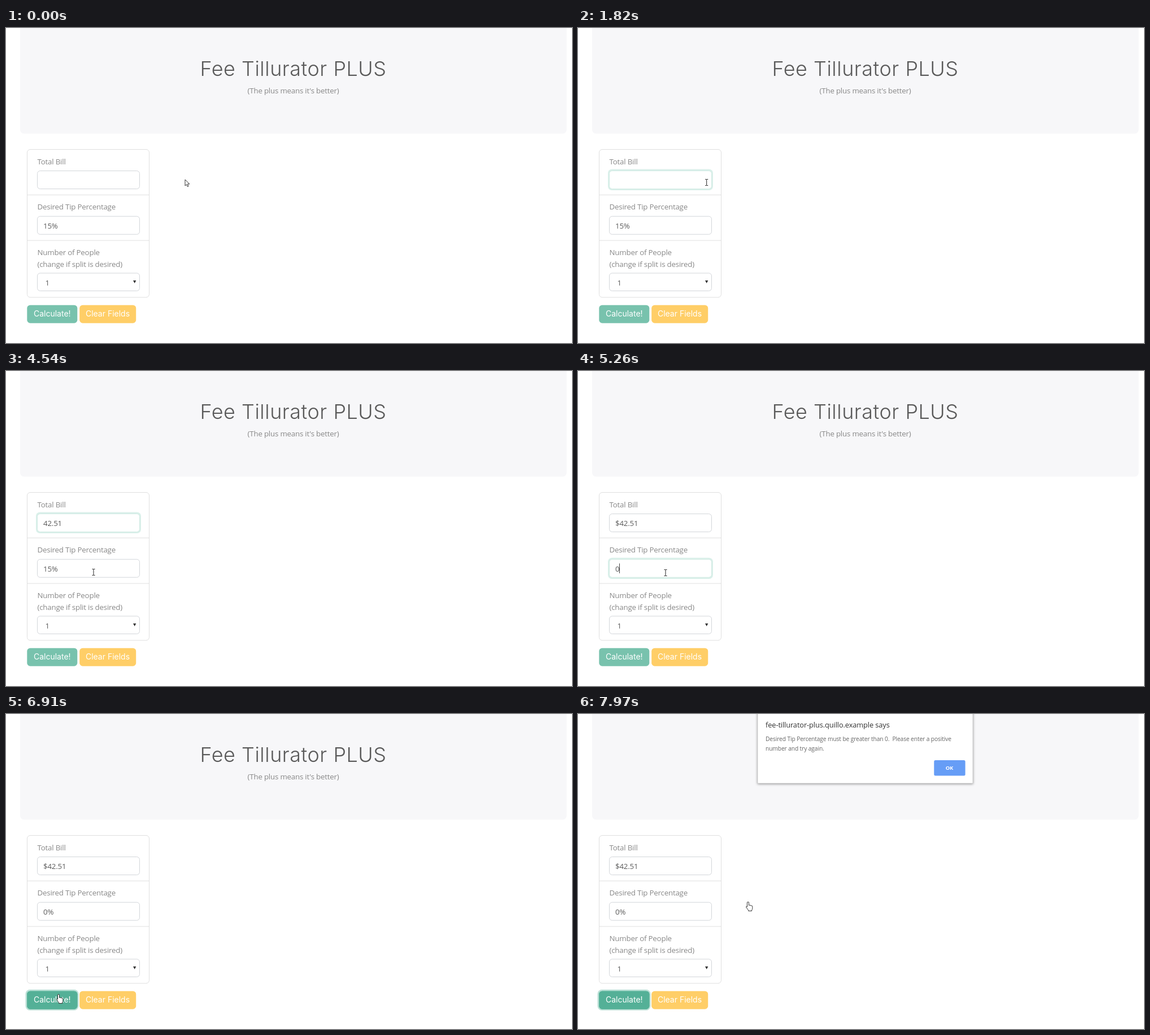
Recreate the animation shown at these times as an HTML page. Size 1002 by 559 pixels, loop 8000 ms.

```html
<!DOCTYPE html>
<html lang="en">
<head>
<meta charset="utf-8">
<title>Tip form</title>
<style>
html, body { margin: 0; width: 100%; height: 100%; overflow: hidden; background: #fff; }
svg { display: block; }
text { font: 13.3px "Open Sans", "Noto Sans", sans-serif; letter-spacing: -.2px; fill: #888; }
.mid { text-anchor: middle; }
.title { font: 300 36px Inter, sans-serif; letter-spacing: .5px; fill: #5a5a5a; }
.label { font: 14px Inter, sans-serif; letter-spacing: 0; fill: #fff; }
.value { fill: #5a5a5a; }
.box { fill: #fff; stroke: #d3d6da; }
.focus .box { stroke: #d0eae3; }
.ring { fill: #daf0ea; }
.line { fill: none; stroke: #dfdfdf; }
#caret { stroke: #444; }
#dialog { filter: drop-shadow(0 1px 2px rgba(0,0,0,.4)); }
#dialog text { font-size: 10.25px; letter-spacing: -.12px; fill: #666; }
#dialog .host { font-size: 12.8px; letter-spacing: -.1px; fill: #333; }
#dialog .ok { font-size: 9.5px; font-weight: 700; fill: #fff; }
#pointer path { fill: #fff; stroke: #222; stroke-width: .9; stroke-linejoin: round; }
#pointer #beam { fill: none; stroke-width: 1; }
</style>
</head>
<body>
<svg width="1002" height="559">
  <rect x="25" y="-10" width="967.5" height="197.5" rx="7" fill="#f7f7f9"/>
  <text class="title mid" x="508.5" y="85">Fee Tillurator PLUS</text>
  <text class="mid" x="508.5" y="115.5">(The plus means it's better)</text>

  <rect class="line" x="37.5" y="215.5" width="216" height="262.5" rx="5.5"/>
  <path class="line" d="M38 296.2H253M38 377H253"/>
  <text x="55.5" y="241.5">Total Bill</text>
  <text x="55.5" y="322.3">Desired Tip Percentage</text>
  <text x="55.5" y="403">Number of People</text>
  <text x="55.5" y="423.5">(change if split is desired)</text>

  <rect class="box" x="55.5" y="253.5" width="181" height="32" rx="5"/>
  <g class="focus" id="billFocus">
    <rect class="ring" x="53" y="250.5" width="186" height="37.5" rx="7"/>
    <rect class="box" x="55.5" y="253.5" width="181" height="32" rx="5"/>
  </g>
  <text class="value" id="bill" x="66" y="275.2"></text>

  <rect class="box" x="55.5" y="334.2" width="181" height="32" rx="5"/>
  <g class="focus" id="tipFocus">
    <rect class="ring" x="53" y="331.5" width="186" height="37.5" rx="7"/>
    <rect class="box" x="55.5" y="334.2" width="181" height="32" rx="5"/>
  </g>
  <rect id="selection" x="66" y="341" width="26" height="18" fill="#3390ff"/>
  <text class="value" id="tip" x="66" y="355.6"></text>
  <path id="caret"/>

  <rect class="box" x="55.5" y="435" width="181" height="31.5" rx="5"/>
  <text class="value" x="69.5" y="456.5">1</text>
  <path d="M225 448h5.4l-2.7 5z" fill="#333"/>

  <rect id="pressRing" x="34.5" y="489" width="94" height="37" rx="8" fill="#bbe0d6"/>
  <rect x="37.3" y="491.7" width="89" height="32" rx="5.5" fill="#78c2ad"/>
  <rect id="hover" x="37.3" y="491.7" width="89" height="32" rx="5.5" fill="#5eb69d"/>
  <rect id="press" x="37.3" y="491.7" width="89" height="32" rx="5.5" fill="#54b097"/>
  <rect x="130.2" y="491.7" width="100" height="32" rx="5.5" fill="#ffce67"/>
  <text class="label mid" x="81.8" y="512.4">Calculate!</text>
  <text class="label mid" x="180" y="512.4">Clear Fields</text>

  <g id="dialog">
    <rect x="318" y="-60" width="381" height="183" fill="#fff" stroke="#c4c4c4" stroke-width=".7"/>
    <text class="host" x="332" y="23.8">fee-tillurator-plus.quillo.example says</text>
    <text x="332" y="47.5">Desired Tip Percentage must be greater than 0.&nbsp; Please enter a positive</text>
    <text x="332" y="64.5">number and try again.</text>
    <rect x="630.3" y="82" width="55.3" height="27.5" rx="2.5" fill="#669df6"/>
    <text class="ok mid" x="657.5" y="99.3">OK</text>
  </g>

  <g id="pointer">
    <path id="arrow" d="M0 0v11l2.5-2.4 1.8 4 1.8-.8-1.7-3.9h3.5z"/>
    <path id="beam" d="M-2.5-5.5h2l.5.5.5-.5h2M0-5V5M-2.5 5.5h2l.5-.5.5.5h2"/>
    <path id="hand" d="M-1.5 1a1.5 1.5 0 0 1 3 0v4.5q1.3-.9 2.3.3 1.4-.7 2.2.5 1.8-.3 1.8 1.4v3q0 2-1.2 3.3v1.5h-6v-1.3l-3.8-5.2q-.6-1.6.9-1.6l.8.8z"/>
  </g>
</svg>
<script>
const LOOP = 8000, BLINK = 530;
const $ = id => document.getElementById(id);

// time, x, y, shape from then on
const moves = [
  [0, 317, 269, 'arrow'], [530, 317, 269, 'arrow'], [620, 292, 275, 'arrow'],
  [750, 264, 277, 'arrow'], [920, 242, 275, 'beam'], [1000, 237.5, 274.5, 'beam'],
  [1320, 227.7, 274, 'beam'], [3450, 227.7, 274, 'beam'], [3700, 207, 298, 'arrow'],
  [3850, 190, 334, 'beam'], [4020, 172, 367, 'arrow'], [4230, 161, 381, 'arrow'],
  [4310, 159, 369, 'arrow'], [4380, 157, 364, 'beam'], [4540, 155, 357, 'beam'],
  [4780, 155, 357, 'beam'], [5010, 160, 360, 'beam'], [5180, 160, 360, 'beam'],
  [5260, 155, 358, 'beam'], [5640, 155, 358, 'beam'], [5760, 149, 368, 'arrow'],
  [6060, 107, 491, 'hand'], [6180, 96, 506, 'hand'], [6380, 93, 498, 'hand'],
  [7600, 93, 498, 'hand'], [7610, 126, 472, 'hand'], [7740, 126, 472, 'hand'],
  [7970, 301, 334, 'hand'], [LOOP, 301, 334, 'hand']
];
const billText = [[0, ''], [2000, '4'], [2080, '42'], [2230, '42.'], [2850, '42.5'], [2920, '42.51'], [4780, '$42.51']];
const tipText = [[0, '15%'], [5260, '0'], [6680, '0%']];
const keyTimes = [1290, 2000, 2080, 2230, 2850, 2920, 4780, 5260];

const clamp = v => Math.max(0, Math.min(1, v));
const ramp = (t, start, span = 150) => clamp((t - start) / span);
const last = (list, test) => list.filter(test).pop();
const fade = (id, value) => $(id).setAttribute('opacity', value);

function drawPointer(t) {
  const i = moves.findIndex(m => m[0] > t);
  const [t0, x0, y0, shape] = moves[i - 1], [t1, x1, y1] = moves[i];
  const p = (t - t0) / (t1 - t0);
  $('pointer').setAttribute('transform', `translate(${x0 + (x1 - x0) * p} ${y0 + (y1 - y0) * p})`);
  for (const id of ['arrow', 'beam', 'hand']) fade(id, +(id === shape));
}

function drawFields(t) {
  for (const [id, steps] of [['bill', billText], ['tip', tipText]])
    $(id).textContent = last(steps, s => s[0] <= t)[1];

  fade('billFocus', ramp(t, 1320, 60) - ramp(t, 4780));
  fade('tipFocus', ramp(t, 4780) - ramp(t, 6680));

  const selected = t >= 4880 && t < 5260;
  fade('selection', +selected);
  $('tip').style.fill = selected ? '#fff' : '';

  const key = last(keyTimes, k => k <= t);
  const lit = key && t < 6680 && !selected && Math.floor((t - key) / BLINK) % 2 === 0;
  const [field, top] = t < 4780 ? ['bill', 261] : ['tip', 341.5];
  const x = Math.floor(66 + $(field).getComputedTextLength()) + .5;
  $('caret').setAttribute('d', `M${x} ${top}v17.5`);
  fade('caret', +!!lit);
}

function drawDialog(t) {
  // the window opens in 90 ms steps
  const left = 1 - ramp(6700 + Math.floor((t - 6700) / 90) * 90, 6880, 270);
  fade('dialog', 1 - left ** 2.6);
  $('dialog').setAttribute('transform', `translate(0 ${-34 * left ** 2})`);
}

function draw(now) {
  const t = now % LOOP;
  drawPointer(t);
  drawFields(t);
  fade('hover', ramp(t, 6060));
  fade('press', ramp(t, 6680));
  fade('pressRing', ramp(t, 6680));
  drawDialog(t);
  requestAnimationFrame(draw);
}
requestAnimationFrame(draw);
</script>
</body>
</html>
```
